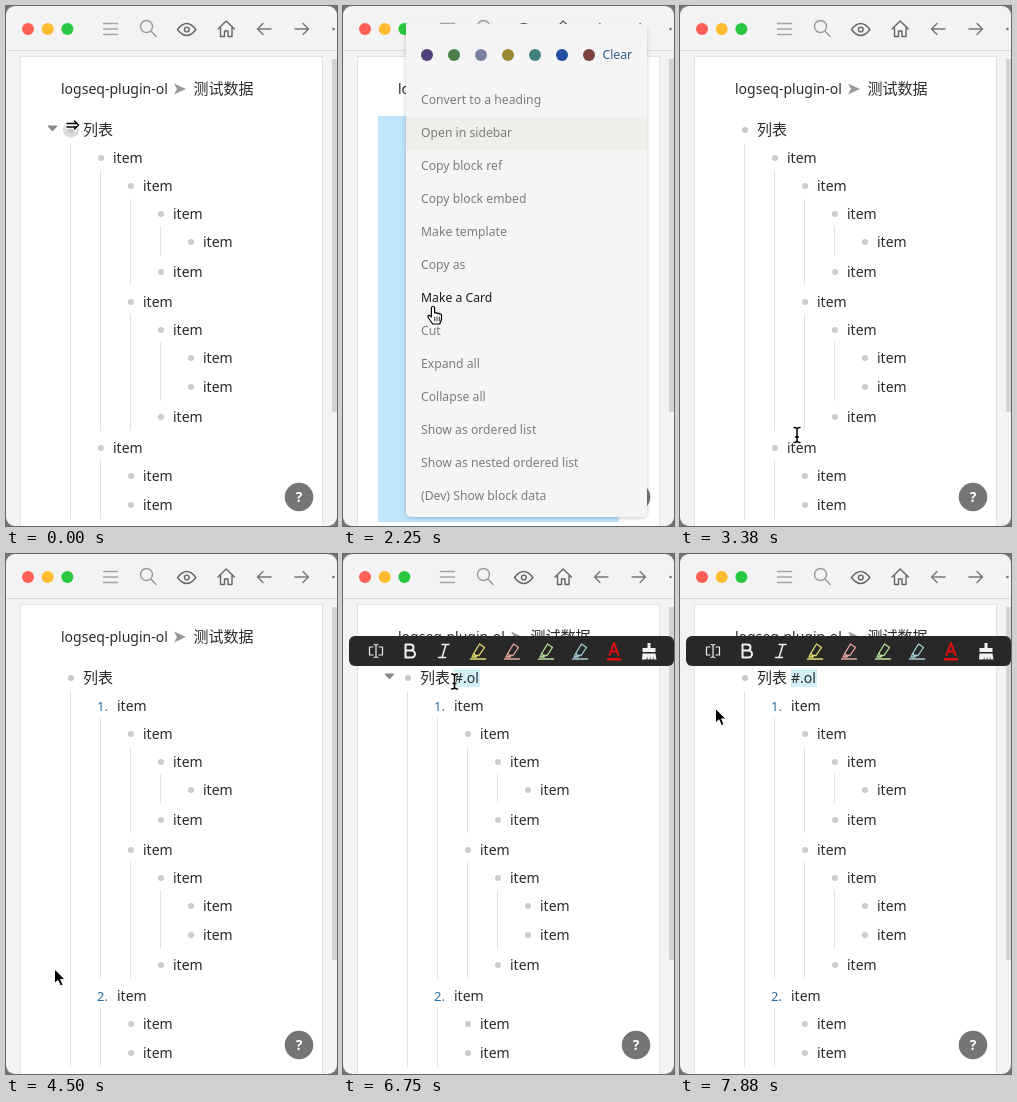
Animation of 331 by 520 pixels, one loop 8 s. Source, as an HTML page:

```html
<!DOCTYPE html>
<html lang="en">
<head>
<meta charset="utf-8">
<title>Ordered list demo</title>
<style>
  html, body { margin: 0; width: 100%; height: 100%; overflow: hidden; background: #777; }
  svg { display: block; width: 331px; height: 520px; }
  text { font: 14px "Noto Sans", "Noto Sans CJK SC", "Noto Sans CJK", sans-serif; fill: #2b2b2b; white-space: pre; }
  .cjk { font-size: 15px; }
  .num { font-size: 13px; fill: #2c6ca3; }
  .menu { font-size: 12.2px; fill: #7c7c7c; }
  .hot { fill: #1c1c1c; }
  .clear { font-size: 12.2px; fill: #2d5c8c; }
</style>
</head>
<body>
<svg id="stage" viewBox="0 0 331 520"></svg>
<script>
const NS = 'http://www.w3.org/2000/svg';
const LOOP = 8000, STEP = 125;
const stage = document.getElementById('stage');

function add(parent, tag, attrs = {}, text) {
  const el = document.createElementNS(NS, tag);
  for (const key in attrs) el.setAttribute(key, attrs[key]);
  if (text !== undefined) el.textContent = text;
  return parent.appendChild(el);
}
const group = (parent, attrs) => add(parent, 'g', attrs);
const rect = (p, x, y, width, height, fill, rx = 0) => add(p, 'rect', { x, y, width, height, fill, rx });
const dot = (p, cx, cy, r, fill) => add(p, 'circle', { cx, cy, r, fill });
const label = (p, x, y, s, cls = '') => add(p, 'text', { x, y, class: cls }, s);
const line = (p, d, stroke, width = 1.4) => add(p, 'path', {
  d, stroke, fill: 'none', 'stroke-width': width, 'stroke-linecap': 'round', 'stroke-linejoin': 'round'
});
const shape = (p, d, fill, stroke = 'none', width = 1) =>
  add(p, 'path', { d, fill, stroke, 'stroke-width': width, 'stroke-linejoin': 'round' });
const show = (el, on) => el.setAttribute('display', on ? 'inline' : 'none');

// Window frame and page
const defs = add(stage, 'defs');
const shadow = add(defs, 'filter', { id: 'shadow', x: '-10%', y: '-10%', width: '120%', height: '120%' });
add(shadow, 'feDropShadow', { dx: 0, dy: 1, stdDeviation: 2, 'flood-opacity': 0.22 });
rect(stage, 0, 0, 331, 520, '#f3f3f3', 9);
rect(stage, 0, 44, 331, 1, '#dcdcdc');
rect(stage, 14.5, 50.5, 302, 480, '#fff').setAttribute('stroke', '#e2e2e2');
rect(stage, 326, 53, 6, 353, '#d3d3d3', 1);
['#fe5f57', '#febc2e', '#28c840'].forEach((c, i) => dot(stage, 22 + i * 19.7, 23, 6, c));

// Header icons
line(stage, 'M97.5 17.5h14M97.5 23h14M97.5 28.5h14', '#a6a6a6', 1.3);
line(stage, 'M146.5 20.5a6 6 0 1 1-12 0a6 6 0 1 1 12 0M145 25l5 5.5', '#999');
line(stage, 'M171.5 23.5q9.2-12 18.4 0q-9.2 12-18.4 0z', '#666');
line(stage, 'M183.2 23.5a2.4 2.4 0 1 1-4.8 0a2.4 2.4 0 1 1 4.8 0', '#666');
line(stage, 'M212 23l8.2-8 8.2 8M214.5 21.500v9h4v-5.500h3.500v5.500h4v-9', '#666');
line(stage, 'M265 23h-13M257 17.500l-5.500 5.500 5.500 5.500', '#777');
line(stage, 'M289 23h13M297 17.500l5.500 5.500-5.500 5.500', '#777');
dot(stage, 327.5, 23, 1.3, '#777');

// Breadcrumb and root block
label(stage, 55, 88, 'logseq-plugin-ol');
shape(stage, 'M168 77.500L180 83L168 88.500L171 83z', '#999');
label(stage, 187.5, 88, '测试数据', 'cjk');
const triangle = (x, y) => shape(stage, `M${x} ${y}h9l-4.500 5z`, '#8a8a8a', '#8a8a8a');
const rootFold = triangle(42, 120);
const itemFold = triangle(72, 439);
const halo = dot(stage, 65, 123.5, 8.3, '#dcdcdc');
dot(stage, 65, 124, 3, '#c8c8c8');
const selection = rect(stage, 111, 115, 26, 18, '#d3eef6');
label(stage, 77, 129, '列表', 'cjk');
const tag = label(stage, 111, 129, '#.ol');

// Guides as x, top, bottom
[[64, 137, 513], [94, 164, 425], [124, 193, 279], [154, 220, 249],
 [124, 308, 424], [154, 336, 395], [94, 454, 513]]
  .forEach(([x, top, end]) => rect(stage, x, top, 1, end - top, '#e2e2e2'));

// Outline rows as depth, centre
const plain = group(stage), ordered = group(stage);
[[0, 152], [1, 180], [2, 208], [3, 236], [2, 266], [1, 296], [2, 324],
 [3, 352], [3, 381], [2, 411], [0, 442], [1, 470], [1, 499]].forEach(([depth, y]) => {
  const x = 95 + depth * 30;
  const home = depth ? stage : plain;
  dot(home, x, y, 3, '#ccc');
  label(home, x + 12, y + 5, 'item');
  if (!depth) {
    label(ordered, 91, y + 5, y < 200 ? '1.' : '2.', 'num');
    label(ordered, 111, y + 5, 'item');
  }
});

// Selected block and help button
const block = rect(stage, 35, 110, 241, 406, '#bfe4fd');
dot(stage, 293, 491, 14.3, '#757575');
add(stage, 'text', {
  x: 293, y: 496, 'text-anchor': 'middle', style: 'font-weight:700;font-size:14px;fill:#fff'
}, '?');

// Context menu
const menu = group(stage);
rect(menu, 63, 20, 241, 491, '#f5f5f5', 5).setAttribute('filter', 'url(#shadow)');
rect(menu, 63, 18, 241, 30, '#f4f4f4');
['#50407c', '#488048', '#7a80a0', '#9a8a32', '#438080', '#2350a0', '#7c4242']
  .forEach((c, i) => dot(menu, 84 + i * 27, 49, 6, c));
label(menu, 259.5, 53, 'Clear', 'clear');
rect(menu, 63, 111, 241, 33, '#efeeea');
const entries = ['Convert to a heading', 'Open in sidebar', 'Copy block ref', 'Copy block embed',
  'Make template', 'Copy as', 'Make a Card', 'Cut', 'Expand all', 'Collapse all',
  'Show as ordered list', 'Show as nested ordered list', '(Dev) Show block data']
  .map((s, i) => label(menu, 78, 98 + i * 33, s, 'menu'));

// Formatting toolbar
const bar = group(stage);
rect(bar, 6, 82, 325, 30, '#282828', 6);
line(bar, 'M30 93h-3.500v8h3.500M36 93h3.500v8h-3.500M33 91v12M31 90.500q2 0 2 1.500q0-1.500 2-1.500M31 103.500q2 0 2-1.500q0 1.500 2 1.500', '#eee', 1.2);
line(bar, 'M62.500 90.500h5a3 3 0 0 1 0 6h-5zM62.500 96.500h6a3.400 3.400 0 0 1 0 7h-6z', '#f2f2f2', 2);
line(bar, 'M99 90.500h7M95.500 103.500h7M103 90.500l-4 13', '#f2f2f2', 1.5);
['#e8e070', '#e8a8a0', '#b8e098', '#a8d0dc'].forEach((c, i) => {
  const pen = group(bar, { transform: `translate(${135 + i * 34} 97)` });
  line(pen, 'M-4 2l5.500-9l5 3.500l-5.500 8h-4zM-4 2l-2 4h4l1-1.500', c, 1.3);
  line(pen, 'M-7.500 8h15', c, 1.5);
});
line(bar, 'M266.500 101l4.500-12 4.500 12M268.200 97.500h5.600', '#e01010', 2);
rect(bar, 264, 104, 14, 2.5, '#e01010');
shape(bar, 'M304.500 89h3v5h5v4h-13v-4h5zM299.500 99.500h13l1 6h-3v-3l-1 3h-2v-3l-1 3h-2v-3l-1 3h-4.500z', '#f2f2f2');

// Pointers, each drawn around its hot spot
const pointer = group(stage);
const cursors = {};
for (const name of ['arrow', 'hand', 'beam', 'swap']) cursors[name] = group(pointer);
shape(cursors.arrow, 'M0 0V14.500L3.400 11.300L6 17L8.600 15.900L6.100 10.400H10.500z', '#000', '#fff', 1);
shape(cursors.hand, 'M-1.600 1.500q1.600-2.500 3.200 0v5.500q1.500-1 2.500.500q1.500-1 2.400.6q1.900-.6 2 1.400v4l-1.800 4.500h-7l-4.200-6q-1.300-2.200.2-2.600q1.300-.2 2.700 1.600z', '#fff', '#000', 1.2);
line(cursors.hand, 'M1.700 11v4M4 11v4M6.300 11v4', '#000', 0.8);
for (const [c, w] of [['#fff', 3.4], ['#000', 1.5]]) {
  line(cursors.beam, 'M-3-7.500q3 0 3 2q0-2 3-2M-3 7.500q3 0 3-2q0 2 3 2M0-6v12M-1.500 2h3', c, w);
  line(cursors.swap, 'M-5-1.500h9M-5 2h9M2.500-4l4 4-4 4', c, w);
}

// Pointer path as step, x, y, look
const path = [
  [0, 66, 119, 'swap'], [1, 65, 121, 'hand'], [5, 64, 123, 'hand'], [7, 62, 125, 'arrow'],
  [14, 62, 125, 'arrow'], [15, 66, 142, 'hand'], [18, 90, 300, 'hand'], [21, 117, 422, 'hand'],
  [27, 117, 429, 'beam'], [30, 117, 429, 'beam'], [31, 100, 427, 'arrow'], [33, 70, 422, 'arrow'],
  [36, 48.5, 415, 'arrow'], [37, 53, 305, 'arrow'], [38, 84, 190, 'arrow'], [39, 130, 138, 'beam'],
  [41, 177, 126, 'beam'], [43, 174, 126, 'beam'], [46, 174, 126, 'beam'], [47, 161, 126, 'beam'],
  [50, 136, 126, 'beam'], [53, 111.5, 127.5, 'beam'], [59, 111.5, 127.5, 'beam'],
  [60, 92, 130, 'arrow'], [61, 64, 142, 'arrow'], [62, 44, 152, 'arrow'], [63, 35.5, 154.5, 'arrow']
];
// The pointer rests over the chosen entry until the menu closes.
path.splice(8, 0, [26, 117, 422, 'hand']);

function pointerAt(k) {
  let i = path.length - 1;
  while (path[i][0] > k) i--;
  const [k0, x0, y0, look] = path[i];
  const [k1, x1, y1] = path[i + 1] || [k0 + 1, x0, y0];
  const f = (k - k0) / (k1 - k0);
  return { x: x0 + (x1 - x0) * f, y: y0 + (y1 - y0) * f, look };
}

function render(time) {
  const k = Math.floor((time % LOOP) / STEP);
  const within = (from, to) => k >= from && k < to;
  const { x, y, look } = pointerAt(k);
  pointer.setAttribute('transform', `translate(${x} ${y})`);
  for (const name in cursors) show(cursors[name], name === look);

  const open = within(10, 27);
  show(halo, k < 10);
  show(rootFold, k < 10 || within(37, 62));
  show(itemFold, within(29, 32));
  show(block, open);
  show(menu, open);
  const hot = within(15, 27) ? Math.floor((y - 77.5) / 33) : -1;
  entries.forEach((el, i) => el.setAttribute('class', i === hot ? 'menu hot' : 'menu'));

  show(plain, k < 29);
  show(ordered, k >= 29);
  show(tag, k >= 43);
  show(bar, k >= 54);
  const left = k < 53 ? Math.min(137, Math.max(111, x)) : 111;
  selection.setAttribute('x', left);
  selection.setAttribute('width', 137 - left);
  show(selection, k >= 50);
}

const start = performance.now();
function tick() {
  render(performance.now() - start);
  requestAnimationFrame(tick);
}
tick();
</script>
</body>
</html>
```
